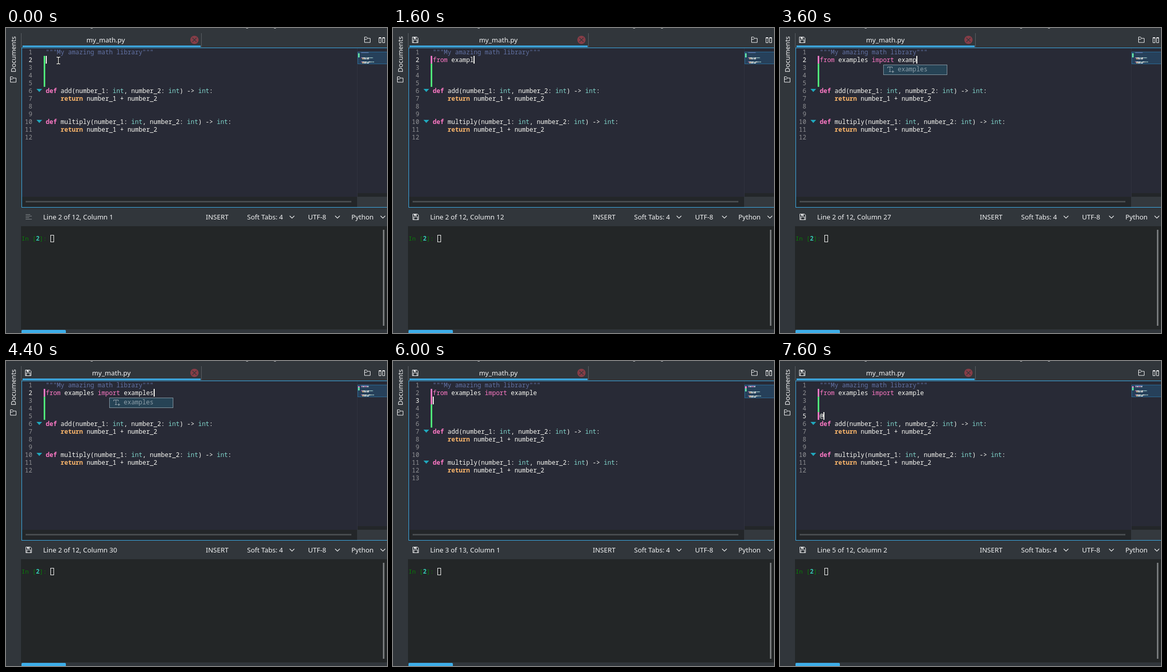
These frames come from a looping animation (738 px wide and 591 px high, 8 s). An HTML page with a canvas:

```html
<!DOCTYPE html>
<html>
<head>
<meta charset="utf-8">
<style>
html, body { margin: 0; width: 100%; height: 100%; overflow: hidden; background: #31363b; }
canvas { display: block; }
</style>
</head>
<body>
<canvas id="stage" width="738" height="591"></canvas>
<script>
const ctx = document.getElementById('stage').getContext('2d');
const LOOP = 8000, CHAR = 7.2, LEFT = 77, ROW = 15, TOP = 39;
const MONO = '12px "Noto Sans Mono", monospace';
const BOLD = 'bold ' + MONO;
const SANS = '13px "Noto Sans", sans-serif';
const WHITE = '#f8f8f2', UI = '#f3f4f5', PINK = '#ff79c6', GREEN = '#50fa7b', BLUE = '#3daee9';
const COLORS = { def: PINK, from: PINK, import: PINK, return: '#ffb86c', int: '#80d5cb' };

const IMPORT = 'from examples import examples';
// [time, column] while the import line is typed
const TYPING = [[0, 1], [200, 2], [300, 3], [400, 4], [600, 5], [800, 6], [1000, 7], [1100, 8],
  [1300, 10], [1600, 12], [1800, 13], [1900, 14], [2000, 16], [2200, 17], [2300, 18], [2400, 20],
  [2600, 22], [3000, 23], [3100, 24], [3300, 25], [3500, 26], [3600, 27], [3700, 28], [3800, 29],
  [4400, 30], [4700, 29]];
// [time, line] of the caret
const MOVES = [[0, 2], [4900, 3], [6100, 4], [6500, 3], [6700, 4], [6900, 5]];
const MAP_TIMES = [[0], [4200], [4400], [4700], [5300], [6900]];

const latest = (list, t) => list.filter(e => e[0] <= t).pop();
const within = (t, a, b) => t >= a && t < b;

function stateAt(t) {
  const typed = latest(TYPING, t)[1] - 1;
  const line = latest(MOVES, t)[1];
  const extra = within(t, 4900, 6500);
  const at = t >= 7600;
  const lines = ['"""My amazing math library"""', IMPORT.slice(0, typed), '', '', at ? '@' : '',
    'def add(number_1: int, number_2: int) -> int:', '    return number_1 + number_2', '', '',
    'def multiply(number_1: int, number_2: int) -> int:', '    return number_1 + number_2', ''];
  if (extra) lines.splice(2, 0, '');
  const changed = n => n === 2 && typed > 0 || n === 3 && extra || n === 5 && at;
  return {
    lines, line, extra, changed,
    col: line === 2 ? typed : at ? 1 : 0,
    caret: !within(t, 5500, 6000) && !within(t, 7400, 7600)
  };
}

function box(x, y, w, h, color) {
  ctx.fillStyle = color;
  ctx.fillRect(x, y, w, h);
}

function frame(x, y, w, h, color) {
  ctx.strokeStyle = color;
  ctx.lineWidth = 1;
  ctx.strokeRect(x + .5, y + .5, w - 1, h - 1);
}

function text(str, x, y, color = UI, font = SANS, align = 'left') {
  ctx.font = font;
  ctx.textAlign = align;
  ctx.fillStyle = color;
  ctx.fillText(str, x, y);
}

function path(d, color, x = 0, y = 0, width = 1) {
  ctx.save();
  ctx.translate(x, y);
  ctx.strokeStyle = color;
  ctx.lineWidth = width;
  ctx.stroke(new Path2D(d));
  ctx.restore();
}

function tokens(line, draw) {
  for (const m of line.matchAll(/""".*"""|\w+|[^\w\s]+/g)) {
    const color = m[0].startsWith('"') ? '#6272a4' : COLORS[m[0]] || WHITE;
    draw(m[0], m.index, color);
  }
}

const folder = (x, y) => path('M.5 .5h4l2 2.5h5v8h-11zM.5 5h4l2-2', UI, x, y);
const floppy = (x, y) => {
  path('M.5 .5h9l2 2v9h-11zM2.5 11v-5h7v5', UI, x, y);
  box(x + 3, y + 1, 5, 3, UI);
  box(x + 6, y + 1, 1, 2, '#31363b');
};
const chevron = x => path('M0 0l4.5 4.5 4.5-4.5', UI, x, 364, 1.1);

function drawChrome(dirty) {
  box(0, 0, 738, 591, '#31363b');
  for (const x of [164, 465, 519]) box(x, 0, 4, 1, '#b5b8ba');
  box(29, 10, 1, 28, '#5b6064');
  box(378, 10, 1, 27, '#5b6064');
  box(32, 34, 345, 3, BLUE);

  ctx.save();
  ctx.translate(19, 86);
  ctx.rotate(-Math.PI / 2);
  text('Documents', 0, 0);
  ctx.restore();
  folder(8, 94);
  folder(694, 17);
  path('M.5 .5h4v10h-4zM7.5 .5h4v10h-4zM0 1.5h5M7 1.5h5', UI, 722, 18);

  text('my_math.py', dirty ? 204 : 193, 28, UI, SANS, 'center');
  if (dirty) floppy(37, 17);
  ctx.fillStyle = '#873d47';
  ctx.beginPath();
  ctx.arc(365, 23, 8, 0, 7);
  ctx.fill();
  path('M-4-4l8 8M4-4l-8 8', '#31363b', 365, 23, 1.2);
}

function drawEditor(s) {
  box(30, 38, 708, 310, '#282a36');
  box(31, 327, 649, 20, '#232629');
  box(38, 335, 631, 3, '#484c4f');
  box(680, 39, 1, 288, '#31333f');
  box(681, 320, 57, 7, '#232629');
  box(680, 327, 58, 20, '#34393e');
  frame(30, 38, 720, 310, BLUE);

  s.lines.forEach((line, i) => {
    const n = i + 1, y = TOP + ROW * i;
    text(n, 51, y + 12, n === s.line ? WHITE : '#909194', MONO, 'right');
    if (n > 1 && n < (s.extra ? 7 : 6)) box(73, y, 3, ROW, s.changed(n) ? PINK : GREEN);
    if (line.startsWith('def')) {
      ctx.fillStyle = '#20a8bd';
      ctx.fill(new Path2D(`M59 ${y + 4}h11l-5.5 6z`));
    }
    tokens(line, (word, at, color) =>
      text(word, LEFT + at * CHAR, y + 12, color, /^(def|return)$/.test(word) ? BOLD : MONO));
  });
  if (s.caret) box(Math.round(LEFT + s.col * CHAR), TOP + ROW * (s.line - 1), 2, ROW, WHITE);
}

function drawMap(s) {
  const h = 2 * s.lines.length;
  box(681, 46, 57, h, '#26405a');
  frame(681, 46, 70, h, '#2b6c98');
  s.lines.forEach((line, i) => {
    const n = i + 1, y = 47 + 2 * i;
    if (n > 1 && n < (s.extra ? 7 : 6)) box(682, y, 3, 2, s.changed(n) ? PINK : '#62dfa0');
    tokens(line, (word, at, color) => box(688 + at / 2, y, word.length / 2, 1.4, color));
  });
}

function drawPopup() {
  box(200, 71, 124, 20, '#264355');
  frame(200, 71, 124, 20, '#8496a1');
  path('M.5 3v-2.500h9v2.500M5 .5v9M3 9.500h4M8 9.500h5M10.500 7v5', '#9aa7b0', 208, 75);
  text('examples', 228, 84, '#8e9fa9', MONO);
}

function drawStatus(s, dirty) {
  if (dirty) floppy(38, 360);
  else path('M0 .5h9M0 3.500h12M0 6.500h7M0 9.500h12', '#82878a', 38, 361);
  text(`Line ${s.line} of ${s.lines.length}, Column ${s.col + 1}`, 72, 371);
  text('INSERT', 387, 371);
  text('Soft Tabs: 4', 467, 371);
  text('UTF-8', 585, 371);
  text('Python', 669, 371);
  [549.5, 637.5, 725.5].forEach(chevron);
}

function drawTerminal() {
  const font = '11.67px "Noto Sans Mono", monospace';
  box(29, 384, 709, 200, '#232627');
  text('In [', 30, 412, '#087d08', font);
  text('2', 58, 412, '#35c9b5', 'bold ' + font);
  text(']:', 65, 412, '#087d08', font);
  frame(86, 401, 7, 14, '#fcfcfc');
  box(730, 391, 3, 186, '#777a7c');
  ctx.fillStyle = BLUE;
  ctx.beginPath();
  ctx.roundRect(30, 585, 86, 12, 2);
  ctx.fill();
}

function drawPointer() {
  const beam = 'M-3.500-6h2.500l1 1 1-1h2.500M0-5v11M-3.500 7h2.500l1-1 1 1h2.500';
  path(beam, '#000', 101.5, 62.5, 3);
  path(beam, '#fff', 101.5, 62.5, 1.3);
}

function render(t) {
  const s = stateAt(t), dirty = t >= 200;
  drawChrome(dirty);
  drawEditor(s);
  drawMap(stateAt(latest(MAP_TIMES, t)[0]));
  drawStatus(s, dirty);
  drawTerminal();
  if (within(t, 3500, 4500)) drawPopup();
  if (!dirty) drawPointer();
}

const start = performance.now();
function tick() {
  render((performance.now() - start) % LOOP);
  requestAnimationFrame(tick);
}
tick();
</script>
</body>
</html>
```
